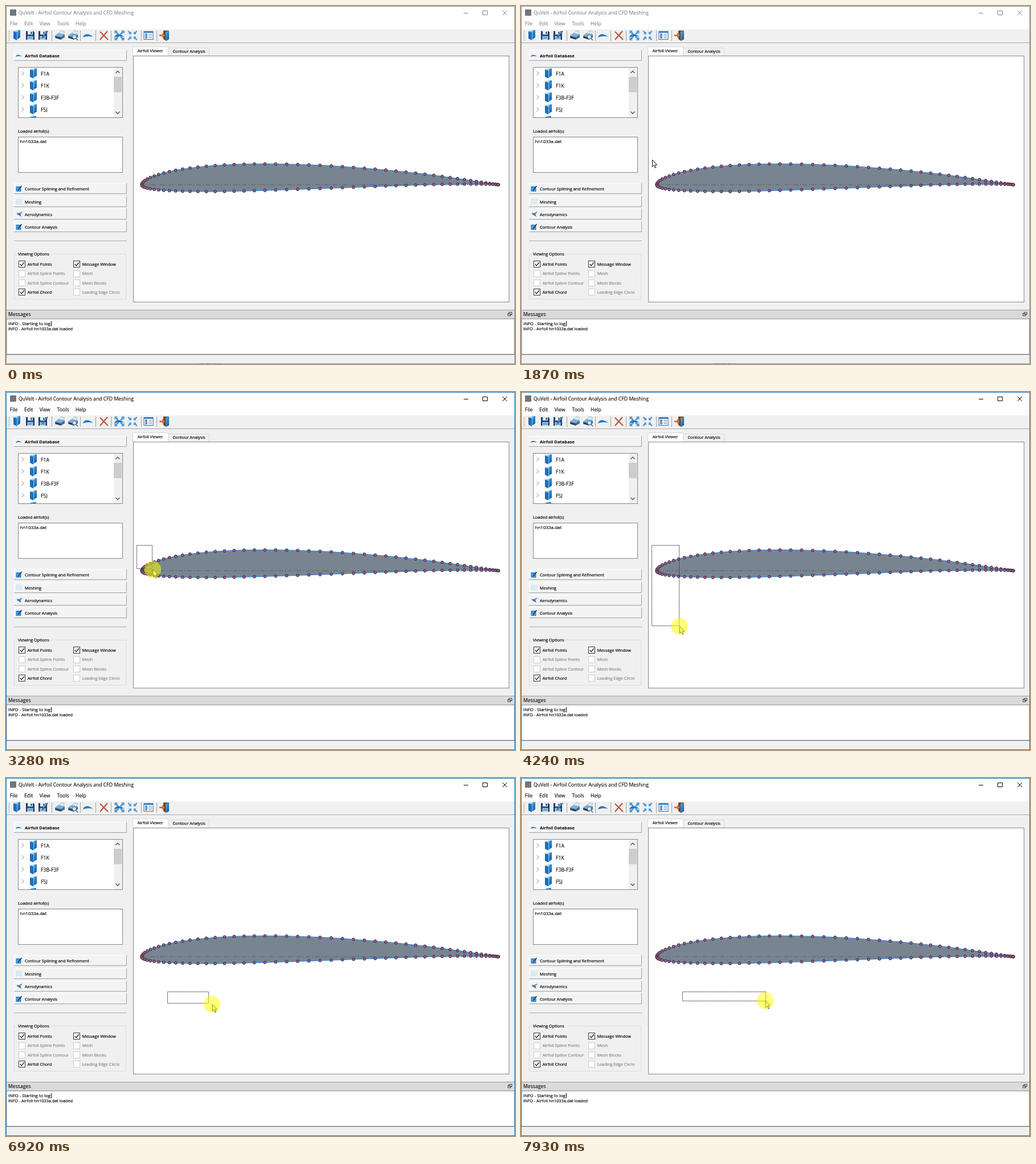
An HTML page for the animation above (8 s loop, 893x627 px).

```html
<!DOCTYPE html>
<html lang="en">
<head>
<meta charset="utf-8">
<title>Airfoil viewer</title>
<style>
html, body { margin: 0; width: 100%; height: 100%; overflow: hidden; background: #f0f0f0; }
svg { display: block; width: 893px; height: 627px; }
text { font: 7.3px "Open Sans", "Noto Sans", sans-serif; fill: #000; stroke: #000; stroke-width: .18px; white-space: pre; }
.big { font-size: 8.7px; stroke-width: .1px; }
.mid { font-size: 8px; }
.log { font-size: 7.65px; }
.bold { font-size: 7.6px; font-weight: 700; stroke: none; }
.off { fill: #858585; stroke: #858585; }
.line { fill: none; stroke: #a0a0a0; }
.box { fill: #fff; stroke: #828790; }
#chrome { --ink: #858585; --edge: #8c8c8c; }
#chrome.active { --ink: #000; --edge: #1677b8; }
#chrome text { fill: var(--ink); stroke: var(--ink); }
#chrome .glyph { fill: none; stroke: var(--ink); }
#chrome .edge { fill: none; stroke: var(--edge); }
#chrome.active .behind { display: none; }
</style>
</head>
<body>
<svg viewBox="0 0 893 627" xmlns="http://www.w3.org/2000/svg">
<defs>
  <linearGradient id="blue" x2="1" y2="1"><stop stop-color="#55b4f0"/><stop offset="1" stop-color="#0b4f96"/></linearGradient>
  <pattern id="grid" width="3" height="3" patternUnits="userSpaceOnUse"><path d="M0 .5H3M.5 0V3" stroke="#b9d8ee" stroke-width=".6"/></pattern>
  <g id="folder">
    <path d="M5 1 13 0V13L7 17Z" fill="url(#blue)"/>
    <path d="M1 2 7 4V18L1 15Z" fill="#1c6fb8"/><path d="M1 2 5 1 10 1 7 4Z" fill="#9bd6f8"/>
    <path d="M7.500 4V17.500" stroke="#8fd0f7" stroke-width=".9"/>
  </g>
  <g id="disk">
    <path d="M0 0H13L15 2V15H0Z" fill="#173f70"/><rect x="3" width="9" height="6" fill="#e4eff8"/>
    <rect x="8.500" y="1" width="2" height="4" fill="#173f70"/><rect x="2.500" y="8.500" width="10" height="6.500" fill="#a9cdea"/>
    <path d="M4 10.500H11M4 12.500H11" stroke="#3a6fa3" stroke-width=".8"/>
  </g>
  <g id="printer">
    <path d="M6 5 11 0 17 2 13 8Z" fill="#d9ecf8" stroke="#7796ad" stroke-width=".6"/>
    <path d="M0 9 6 4.500 17 7V12L10 16 0 13Z" fill="#4a6d8d"/><path d="M0 9 6 4.500 17 7 10 11.500Z" fill="#7fb0d6"/>
    <path d="M1 11.500 10 14" stroke="#132c48" stroke-width="1.500"/>
  </g>
  <path id="wing" d="M0 8C2 1 9 0 18 7 11 5 5 6 0 8Z" fill="#1f78c8"/>
  <g id="edit">
    <rect x=".5" y="2" width="9" height="9" fill="#2c85cc"/><path d="M2 5H8M2 7H8M2 9H8" stroke="#a8d4f2" stroke-width=".6"/>
    <path d="M4 9 10.500 1" stroke="#173f70" stroke-width="1.700"/>
  </g>
  <g id="plane">
    <path d="M0 4 3 5 9 2 12 1 11 3 6 7 4 7Z" fill="#6f8ba5"/><path d="M2 3 8 5 10 10 5 7Z" fill="#2c72b3"/>
  </g>
  <path id="corner" d="M0 0H5.500L4 1.500 7.500 6 6 7.500 1.500 4 0 5.500Z"/>
</defs>

<rect width="893" height="627" fill="#f0f0f0"/>
<rect width="893" height="41" fill="#fff"/>
<path class="line" d="M0 64.500H893" stroke="#b4b4b4"/>
<path d="M0 65.500H893" stroke="#fafafa"/>

<g id="chrome">
  <rect x="7" y="6" width="11" height="11" fill="#6d7780"/>
  <text class="big" x="22" y="15">QuVelt - Airfoil Contour Analysis and CFD Meshing</text>
  <g id="menu"></g>
  <path class="glyph" d="M803 12.500H811M836.500 8.500H844.500V15.500H836.500ZM871 8 879 16M879 8 871 16"/>
  <path class="edge" d="M.5 .5H892.500V626.500H.5Z"/>
  <path class="behind" d="M338 626.500H376" stroke="#555" stroke-dasharray="1 2 3 1 2 2"/>
</g>

<g id="toolbar">
  <path d="M5.500 44V61" stroke="#b0b0b0" stroke-width="2" stroke-dasharray="1.500 1.500"/>
  <path class="line" d="M80.500 43V61M130.500 43V61M157.500 43V61M184.500 43V61M237.500 43V61M264.500 43V61" stroke="#cfcfcf"/>
  <use href="#folder" x="12" y="42"/>
  <use href="#disk" x="35" y="44"/>
  <use href="#disk" x="57" y="44"/><path d="M64 55 73 44" stroke="#1d4d82" stroke-width="2"/><path d="M65 53 72 45" stroke="#dcecf8" stroke-width=".7"/>
  <use href="#printer" x="86" y="43"/>
  <use href="#printer" x="109" y="43"/>
  <circle cx="120" cy="54" r="3.500" fill="#d5edfb" stroke="#39678f"/><path d="M122.500 56.500 126 60" stroke="#39678f" stroke-width="1.600"/>
  <use href="#wing" x="135" y="47"/>
  <path d="M165 45 179 59M178 44 165 59" fill="none" stroke="#c2492f" stroke-width="2"/><path d="M165 44 178 57" stroke="#9a8074" stroke-width="1"/>
  <g id="arrows"></g>
  <use href="#wing" x="190" y="47"/>
  <rect x="242" y="44.500" width="16" height="14" fill="#fff" stroke="#2a6cab"/><rect x="242" y="44" width="16" height="3" fill="#2a7fd0"/>
  <path d="M244 49.500H248M244 52.500H248M244 55.500H248" stroke="#1f66ab" stroke-width="2"/><path d="M250 49.500H256M250 52.500H256M250 55.500H256" stroke="#6a8398"/>
  <path d="M276 43H286V58L281 61 276 58Z" fill="#704524"/><path d="M280 45 286 43V58L280 61Z" fill="url(#blue)"/>
  <path d="M269 50H274V47L279 51.500 274 56V53H269Z" fill="#d9703d"/>
</g>

<g id="side">
  <g id="bevels"></g>
  <use href="#wing" transform="translate(17 84) scale(.62)"/>
  <text class="bold" x="33" y="89.700">Airfoil Database</text>
  <rect class="box" x="21.500" y="107.500" width="183" height="88"/>
  <rect x="189" y="108" width="15" height="87" fill="#f0f0f0"/><rect x="189" y="124" width="14" height="27" fill="#cdcdcd"/>
  <path d="M192.500 117.500 196 114 199.500 117.500M192.500 185 196 188.500 199.500 185" fill="none" stroke="#505050" stroke-width="1.300"/>
  <g id="tree"></g>
  <path d="M43 195V194L53 192.500V195Z" fill="#2182cf"/>
  <text x="21" y="222.300">Loaded airfoil(s)</text>
  <rect class="box" x="21.500" y="229.500" width="183" height="62"/>
  <text class="mid" x="24.500" y="240">hn1033a.dat</text>
  <use href="#edit" x="17" y="314"/><use href="#edit" x="17" y="381"/>
  <rect x="17" y="337" width="11" height="11" fill="url(#grid)"/>
  <use href="#plane" x="17" y="359"/>
  <path class="line" d="M14 411.500H212"/><path d="M14 412.500H212" stroke="#fff"/>
  <rect class="line" x="14.500" y="434.500" width="196" height="79" style="stroke:#dcdcdc"/>
  <rect x="19" y="430" width="58" height="9" fill="#f0f0f0"/>
  <text x="21" y="437.200">Viewing Options</text>
  <g id="checks"></g>
</g>

<rect x="284.500" y="73.500" width="72" height="14" fill="#f0f0f0" stroke="#d9d9d9"/>
<rect class="box" x="223.500" y="87.500" width="659" height="431"/>
<path d="M222.500 87V71.500H284.500V87" fill="#fff" stroke="#d9d9d9"/>
<text x="230.700" y="81.300">Airfoil Viewer</text>
<text x="292.500" y="82.300">Contour Analysis</text>

<rect x="1" y="532" width="891" height="16" fill="#dadada"/>
<path class="line" d="M1 532.500H892"/>
<text class="big" x="4" y="543">Messages</text>
<path d="M882.500 536.500H887.500V540.500H882.500ZM880.500 538.500H885.500V542.500H880.500Z" fill="#eee" stroke="#333" stroke-width=".9"/>
<rect class="box" x="1" y="548" width="891" height="62"/>
<path d="M1 610.500H892" stroke="#777"/>
<text class="log" x="4" y="558.700">INFO - Starting to log</text>
<path d="M79.500 552V561" stroke="#000"/>
<text x="4" y="568">INFO - Airfoil hn1033a.dat loaded</text>

<path id="foil" fill="#788591" stroke="#3b8fdc" stroke-width="1.300"/>
<path d="M238 313H864" stroke="#535c66" stroke-width=".9" stroke-dasharray="8 3 2 3"/>
<g id="points" fill="#a05c88" stroke="#2a2533" stroke-width=".9"></g>

<rect id="band" fill="none" stroke="#33334a" stroke-dasharray="2 1"/>
<g id="pointer">
  <path d="M.5 .5V12.500L3.300 10 5.200 14.500 7 13.700 5.200 9.300H8.700Z" fill="#fff" stroke="#000" stroke-width=".9"/>
  <circle id="halo" r="14.700" cy=".3" fill="#ff0" fill-opacity=".53"/>
</g>
</svg>

<script>
const $ = id => document.getElementById(id);
const fill = (id, items, draw) => { $(id).innerHTML = items.map(draw).join(''); };

fill('menu', [['File', 6.7], ['Edit', 32], ['View', 58.7], ['Tools', 89.5], ['Help', 122]],
  ([name, x]) => `<text class="big" x="${x}" y="34.3">${name}</text>`);

fill('bevels', [[77, ''], [310, 'Contour Splining and Refinement'], [333, 'Meshing'], [355, 'Aerodynamics'], [377, 'Contour Analysis']],
  ([y, name]) => `<rect x="14" y="${y}" width="197" height="18" fill="#f3f3f3"/>
    <path d="M14.5 ${y + 18}V${y + .5}H211" fill="none" stroke="#fff"/>
    <path class="line" d="M14 ${y + 18.5}H211.500V${y}"/>
    <text x="33" y="${y + 12.7}">${name}</text>`);

fill('tree', ['F1A', 'F1K', 'F3B-F3F', 'F5J'], (name, i) => {
  const y = 118 + 21 * i;
  return `<path d="M27.500 ${y - 3.5}L31.300 ${y}L27.500 ${y + 3.5}" fill="none" stroke="#8a8a8a"/>
    <use href="#folder" x="41" y="${y - 9}"/><text class="big" x="61" y="${y + 3.5}">${name}</text>`;
});

fill('checks', [['Airfoil Points', 1], ['Airfoil Spline Points', 0], ['Airfoil Spline Contour', 0], ['Airfoil Chord', 1],
  ['Message Window', 1], ['Mesh', 0], ['Mesh Blocks', 0], ['Leading Edge Circle', 0]], ([name, on], i) => {
  const x = i < 4 ? 22 : 118, y = 452.3 + 16.35 * (i % 4), top = Math.round(y - 6) + .5;
  return `<rect x="${x + .5}" y="${top}" width="11" height="11" fill="#fff" stroke="${on ? '#333' : '#ccc'}"/>` +
    (on ? `<path d="M${x + 2.7} ${top + 5.5}l2.500 2.800 4.700-5.800" fill="none" stroke="#111" stroke-width="1.200"/>` : '') +
    `<text class="${on ? '' : 'off'}" x="${x + 15.7}" y="${y + 2.7}">${name}</text>`;
});

// Four-way arrows: pointing out from the centre, then pointing in to it.
fill('arrows', [0, 1, 2, 3], k => `<g fill="#4d9ad6" transform="translate(199 51.500) rotate(${90 * k})"><use href="#corner" x="-8.500" y="-8.500"/></g>
  <g fill="#4d9ad6" transform="translate(222 51.500) rotate(${90 * k}) translate(2 2) scale(.85)"><use href="#corner"/></g>`);

// Contour heights from trailing edge over the top, around the nose and back; x is cosine spaced.
const heights = [313, 310.8, 304, 294.5, 285.6, 279, 276.5, 279.3, 287.7, 300.2, 313,
  320.3, 324, 325, 323, 319.8, 316.2, 313.2, 312, 312.2, 313];
function spline(list, u) {
  const i = Math.min(Math.floor(u), list.length - 2), s = u - i;
  const at = k => list[Math.max(0, Math.min(list.length - 1, k))];
  const [a, b, c, d] = [at(i - 1), at(i), at(i + 1), at(i + 2)];
  return b + s / 2 * (c - a + s * (2 * a - 5 * b + 4 * c - d + s * (3 * (b - c) + d - a)));
}
const contour = Array.from({ length: 100 }, (_, j) =>
  [551 + 313 * Math.cos(j * Math.PI / 50), spline(heights, j / 5)].map(v => v.toFixed(2)));
$('foil').setAttribute('d', 'M' + contour.join('L') + 'Z');
fill('points', contour, ([x, y]) => `<circle cx="${x}" cy="${y}" r="2.450"/>`);

const LOOP = 8000;
const PRESS = 2370, RELEASE = 5660, PRESS2 = 6660;
// Bursts of movement: start, end, number of steps.
const bursts = [[160, 610, 8], [750, 1510, 13], [1570, 1870, 4], [2370, 3140, 13], [3210, 3980, 12], [4050, 4240, 4],
  [5660, 5980, 6], [6120, 6360, 5], [6540, 7310, 13], [7370, 7420, 2], [7670, 7930, 5]];
// Pointer path: time, x, y.
const path = [[160, 488, 616], [290, 412, 500], [420, 330, 392], [610, 268, 323], [690, 268, 323],
  [940, 262, 333], [1250, 244, 299], [1510, 234, 271], [1870, 230, 269], [2500, 230, 269],
  [2800, 238, 280], [3280, 257.5, 310.5], [3650, 270, 362], [3980, 277.5, 403], [4240, 278, 410], [5660, 278, 410],
  [5980, 271, 386], [6060, 271, 386], [6360, 252, 366], [6480, 252, 366], [6668, 283, 376],
  [6920, 360, 395.5], [7120, 415, 407], [7310, 447, 414], [7420, 448, 415], [7610, 448, 415], [7930, 428.5, 389.5]];

// Time of the latest movement step; step times are only exact to 10 ms, hence the slack.
function snap(t) {
  const burst = bursts.findLast(b => b[0] <= t);
  if (!burst) return 0;
  const [start, end, steps] = burst, gap = (end - start) / (steps - 1);
  return start + gap * Math.min(steps - 1, Math.floor((t - start + 9) / gap));
}
function place(t) {
  const k = path.findIndex(p => p[0] > t);
  if (k < 0) return path.at(-1).slice(1);
  if (k === 0) return path[0].slice(1);
  const [a, b] = [path[k - 1], path[k]], s = (t - a[0]) / (b[0] - a[0]);
  return [a[1] + s * (b[1] - a[1]), a[2] + s * (b[2] - a[2])];
}
const show = (el, on) => { el.style.display = on ? '' : 'none'; };

function draw(time) {
  const t = time % LOOP, now = snap(t);
  const [x, y] = place(now);
  $('chrome').classList.toggle('active', t >= PRESS);
  show($('pointer'), t >= 160);
  $('pointer').setAttribute('transform', `translate(${x.toFixed(1)} ${y.toFixed(1)})`);
  const second = now >= PRESS2;
  show($('halo'), second || (t >= PRESS && t < RELEASE));

  // The selection band trails the pointer slightly.
  const [left, top] = second ? [283.5, 374.5] : [229.5, 268.5];
  const [right, bottom] = place(now - 20).map(v => Math.round(v - .6) + .5);
  const band = $('band');
  show(band, second || (now > 2500 && now < RELEASE + 30));
  band.setAttribute('x', left);
  band.setAttribute('y', top);
  band.setAttribute('width', Math.max(0, right - left));
  band.setAttribute('height', Math.max(0, bottom - top));
}
const began = performance.now();
function tick() {
  draw(performance.now() - began);
  requestAnimationFrame(tick);
}
tick();
</script>
</body>
</html>
```
